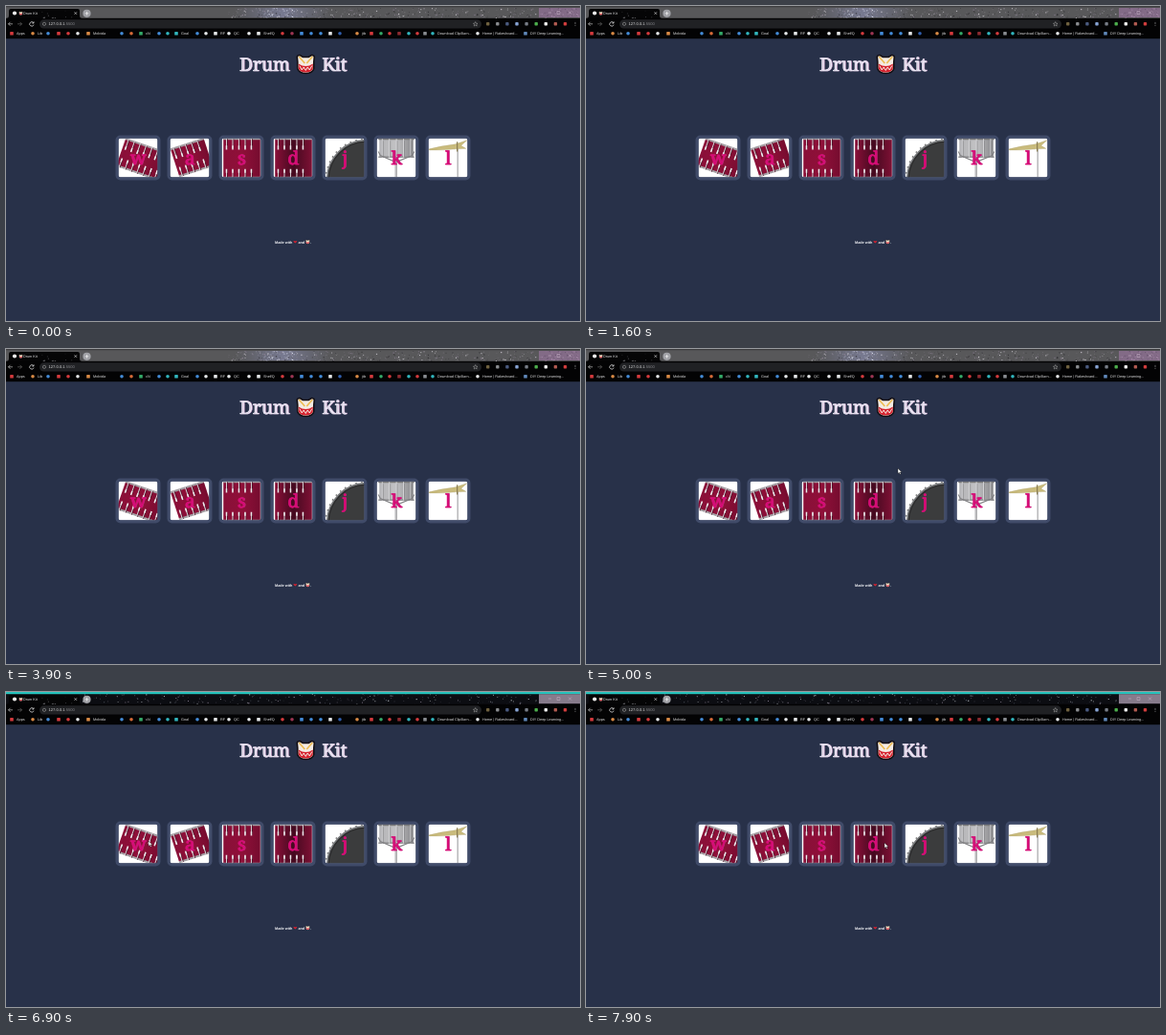
Recreate the animation shown at these times as an HTML page. Size 600 px wide and 330 px high, loop 8 s.

```html
<!DOCTYPE html>
<html lang="en">
<head>
<meta charset="utf-8">
<title>Drum Kit</title>
<style>
html, body { margin: 0; width: 100%; height: 100%; overflow: hidden; background: #283149; }
svg { display: block; }
#stage { width: 600px; height: 330px; }
text { font-family: "Liberation Sans", Arial, sans-serif; text-rendering: geometricPrecision; }
.ui { font-size: 3.8px; fill: #dededf; }
.note { font-size: 3.8px; font-weight: bold; fill: #f4f5f8; }
.title, .key { font-family: "Noto Serif", serif; font-size: 19px; }
.title { fill: #eef3fb; stroke: #eef3fb; stroke-width: .55; text-shadow: .7px 0 #d3a9cd; }
.key { fill: #dd0474; stroke: #dd0474; stroke-width: .5; text-anchor: middle; text-shadow: .7px 0 #c32b80; }
</style>
</head>
<body>
<svg id="stage" viewBox="0 0 600 330"></svg>
<script>
const stage = document.getElementById('stage');

let seed = 7;
const rnd = () => (seed = seed * 16807 % 2147483647) / 2147483647;
const many = (n, f) => Array.from({ length: n }, (_, i) => f(i)).join('');
const rect = (x, y, w, h, fill, more = '') =>
  `<rect x="${x}" y="${y}" width="${w}" height="${h}" fill="${fill}" ${more}/>`;
const disc = (x, y, r, fill, more = '') => `<circle cx="${x}" cy="${y}" r="${r}" fill="${fill}" ${more}/>`;
const path = (d, stroke, width, fill = 'none', more = '') =>
  `<path d="${d}" stroke="${stroke}" stroke-width="${width}" fill="${fill}" ${more}/>`;
const text = (x, y, s, cls = 'ui', more = '') => `<text x="${x}" y="${y}" class="${cls}" ${more}>${s}</text>`;

const stars = (n, x0, x1, colors) => many(n, i => {
  const s = .5 + rnd() * .7;
  return rect((x0 + rnd() * (x1 - x0)).toFixed(1), (2 + rnd() * 10).toFixed(1), s.toFixed(1), s.toFixed(1),
    colors[i % colors.length], `opacity="${(.3 + rnd() * .7).toFixed(2)}"`);
});

// Small drum symbol in a 20 x 20 box
const drumIcon = (x, y, scale) => `<g transform="translate(${x} ${y}) scale(${scale})">
  ${path('M1 3Q1 1 4 1L7 3H13L16 1Q19 1 19 3L18.5 8V15Q17 20 10 20Q3 20 1.5 15V8Z', '#151015', 1.6, '#f4ece4')}
  ${path('M2.5 10Q10 15 17.5 10V15Q16 19 10 19Q4 19 2.5 15Z', 'none', 0, '#d6232f')}
  ${path('M3 2.5L9 9.5M17 2.5L11 9.5', '#edbd55', 1.7)}
  ${path('M3.5 12L6 16.5L8 13.5L10 17L12 13.5L14 16.5L16.5 12', '#f7ece6', 1)}</g>`;

function chrome() {
  const idle = `<g id="idle">${rect(0, 0, 600, 13, '#58585a')}${rect(0, 0, 600, 1.3, '#3c3c3f')}
    ${rect(557, 2, 43, 10, '#836b87')}${rect(240, 2, 100, 10, 'url(#haze)')}
    ${stars(330, 232, 557, ['#e0dde4', '#29282c', '#97899e', '#77757a'])}
    ${stars(70, 265, 305, ['#d3d5e6', '#a1a3bb'])}${stars(60, 557, 600, ['#b393b5', '#614d69'])}</g>`;
  const active = `<g id="active">${rect(0, 0, 600, 13, '#0c0d12')}${rect(0, 0, 600, 2.2, '#25c2bb')}
    ${rect(557, 2.2, 43, 10, '#877b8b')}${stars(210, 80, 557, ['#d7dde3', '#59606c', '#8f8498'])}</g>`;
  const tab = path('M0 13Q3 13 3 10V5Q3 3 5 3H75Q77 3 77 5V10Q77 13 80 13Z', 'none', 0, '#050506')
    + `<svg x="4" width="72" height="13" viewBox="4 -2 72 13">${stars(16, 36, 74, ['#b5b5bd'])}</svg>`
    + disc(9, 7.5, 2.1, '#ededed') + drumIcon(13.5, 5.6, .2) + text(18, 9, 'Drum Kit')
    + path('M71.5 6.3L74 8.8M74 6.3L71.5 8.8', '#eee', .6)
    + disc(84.5, 7.8, 4.1, '#a2a3a8') + path('M82.7 7.8H86.3M84.5 6V9.6', '#fff', .6)
    + path('M567 7H570M576 5.5H579V8.5H576ZM588 5.5L591 8.5M591 5.5L588 8.5', '#c9b4c8', .5);
  const bar = rect(0, 12.8, 600, 21.4, '#030304')
    + rect(35, 14.3, 462, 9.2, '#202124', 'rx="4.6"')
    + path('M7 18.8H2.5M4.5 16.8L2.5 18.8L4.5 20.8', '#ddd', .6)
    + path('M12 18.8H16.5M14.5 16.8L16.5 18.8L14.5 20.8', '#777', .6)
    + path('M28.7 17.6A2.2 2.2 0 1 0 29 19.6M29 16.3V18H27.3', '#eee', .7)
    + disc(40, 18.8, 1.6, 'none', 'stroke="#bbb" stroke-width=".5"')
    + text(44.5, 20.3, '127.0.0.1<tspan fill="#85868a">:5500</tspan>', 'ui', 'style="font-size:4.1px"')
    + path('M490.7 16.5L491.4 18.2L493 18.3L491.8 19.4L492.2 21L490.7 20L489.2 21L489.6 19.4L488.4 18.3L490 18.2Z', '#ccc', .4);
  const extensions = ['#6f613f', '#8a8c90', '#4a5a80', '#86a2d2', '#777c86', '#4cad4c', '#eeeeee', '#b05a50', '#d03c3c']
    .map((c, i) => rect(502 + i * 10.1, 17, 3.4, 3.6, c, 'rx=".8"')).join('')
    + many(3, i => disc(595, 17.2 + i * 1.6, .45, '#ddd'));
  return idle + active + tab + bar + extensions;
}

function bookmarks() {
  const blue = '#438bd8', red = '#d43a3d', green = '#34a968', teal = '#31b5bd', gold = '#d98a45', pale = '#e4e6e8', grey = '#888b90';
  const items = [
    [6, red, 'Apps'], [28, gold, 'Lib'], [44, blue], [55, red], [65, red], [75, pale], [86, gold, 'Molvida'],
    [121, blue], [131, '#d66a37'], [141, green, 'cN'], [160, blue], [169, teal], [178, teal, 'Goal'], [200, blue],
    [209, pale], [219, pale, 'RF'], [233, pale, 'QC'], [254, pale], [264, pale, 'ShelfQ'], [289, red], [299, '#9c3552'],
    [309, blue], [319, blue], [329, blue], [339, pale], [349, '#315fae'], [367, gold, 'jtb'], [382, red],
    [392, green], [401, red], [411, '#8c2b31'], [421, teal], [430, red], [438, grey], [446, teal, 'Download ClipBarn...'],
    [493, pale, 'Home | Rakeshvard...'], [543, '#5f87b8', 'DIY Deep Learning...']
  ];
  return items.map(([x, color, label], i) =>
    (i % 3 ? disc(x, 28.7, 1.8, color) : rect(x - 1.8, 26.9, 3.6, 3.6, color, 'rx=".6"'))
    + (label ? text(x + 5, 30, label) : '')).join('');
}

// Shell with rims and tension rods, drawn from its top left corner
const shell = (w, h, fill) => rect(0, 1, w, h - 2, fill)
  + rect(0, 0, w, 2, '#a39ea2') + rect(0, h - 2, w, 2, '#a39ea2')
  + many(Math.floor(w / 6.4), i => {
    const x = 3.2 + i * 6.4;
    return path(`M${x + .8} 1V11M${x + .8} ${h - 9}V${h}`, '#4a1428', 1)
      + path(`M${x} 0V11M${x} ${h - 9}V${h}`, '#d6cfd4', 1)
      + path(`M${x} 8V12M${x} ${h - 10}V${h - 6}`, '#eee7eb', 1.5);
  });
const place = (transform, body) => `<g transform="${transform}">${body}</g>`;

const pads = {
  w: place('translate(8 0) rotate(19)', shell(46, 31, 'url(#wine)')),
  a: place('translate(.5 11) rotate(-18)', shell(36, 31, 'url(#wine)')),
  s: place('translate(2 0)', shell(38, 42, 'url(#wine)')),
  d: place('translate(2 0)', shell(38, 42, 'url(#dark)')),
  j: disc(43, 43, 42, 'none', 'stroke="#777" stroke-width="1.4" stroke-dasharray="1.5 4.5"')
    + disc(43, 43, 40.6, '#3b3c3d', 'stroke="#77797b" stroke-width="1.6"')
    + disc(43, 43, 39, 'none', 'stroke="#29292a" stroke-width="1"'),
  k: rect(3, 1, 35, 19, 'url(#steel)') + rect(2, 0, 37, 2, '#777') + rect(2, 19, 37, 1.4, '#8b8b8d')
    + many(5, i => path(`M${6 + i * 7.3} 1V20`, '#d8d8da', .9) + path(`M${7 + i * 7.3} 3V19`, '#77777a', .5))
    + path('M2 14L4 18L20 25L37 18L39 14', '#808083', 1.1) + path('M20.2 20V41', '#8d8d90', 2) + path('M20 21V41', '#cfcfd2', .7),
  l: path('M30.5 9V41', '#a0a0a2', 1.1)
    + path('M1 11.5Q15 8 28 6.5L40 2.5L34 8L39 11L29 11.5Q14 13 1 12.5Z', '#a2955f', .3, '#c9bb7c')
    + path('M30 4V14', '#8a7d52', 1.2)
};

const tile = (key, i) => {
  const x = 138 + 54 * i;
  return `<svg x="${x - 20.8}" y="138.2" width="41.6" height="41.6" viewBox="0 0 41 41">${rect(0, 0, 41, 41, '#fff')}${pads[key]}</svg>`
    + rect(x - 21.9, 137.1, 43.8, 43.8, 'none', 'rx="3.4" stroke="#404b69" stroke-width="3.2"')
    + text(x, 165.5, key, 'key');
};

const gradient = (id, ...colors) => `<linearGradient id="${id}">${colors.map((c, i) =>
  `<stop offset="${i / (colors.length - 1)}" stop-color="${c}"/>`).join('')}</linearGradient>`;

stage.innerHTML = `<defs>${gradient('wine', '#8a0f38', '#8f1039', '#760c2f')}
  ${gradient('dark', '#8a0f38', '#450a20', '#7d1034')}${gradient('steel', '#b4b4b7', '#c2c2c4', '#88888b')}
  ${gradient('haze', '#77799000', '#777990', '#77799000')}</defs>`
  + rect(0, 0, 600, 330, '#283149') + chrome() + bookmarks()
  + text(244, 68.3, 'Drum', 'title') + drumIcon(303.3, 50.5, 1) + text(330.2, 68.3, 'Kit', 'title')
  + Object.keys(pads).map(tile).join('')
  + text(281, 248.6, 'Made with', 'note')
  + path('M302.3 248.6L300.4 246.7Q300.8 245.6 302.3 246.6Q303.8 245.6 304.2 246.7Z', 'none', 0, '#d9222f')
  + text(305.4, 248.6, 'and', 'note') + drumIcon(313.2, 244.8, .22) + text(317.8, 248.6, '.', 'note')
  + path('M0 0V5.4L1.3 4.3L2.2 6.3L3.2 5.8L2.3 3.9H4Z', '#111', .4, '#fff', 'id="cursor"');

const [idle, active, cursor] = ['idle', 'active', 'cursor'].map(id => document.getElementById(id));

// Pointer stops: time, x, y
const stops = [[4300, 606, 90], [4700, 326, 126], [5000, 326, 125], [5700, 326, 125], [5900, 326, 124],
  [6300, 326, 124], [6800, 149, 156], [7400, 149, 156], [7900, 312, 158], [8000, 312, 158]];

function pointer(t) {
  const i = Math.max(1, stops.findIndex(s => s[0] >= t));
  const [t0, x0, y0] = stops[i - 1], [t1, x1, y1] = stops[i];
  const p = Math.max(0, (t - t0) / (t1 - t0)), e = p * p * (3 - 2 * p);
  return [x0 + (x1 - x0) * e, y0 + (y1 - y0) * e];
}

const start = performance.now();
function draw() {
  const t = Math.floor((performance.now() - start) % 8000 / 100) * 100;
  const focused = t >= 6800;
  idle.style.display = focused ? 'none' : '';
  active.style.display = focused ? '' : 'none';
  cursor.style.display = t >= 4400 ? '' : 'none';
  cursor.setAttribute('transform', `translate(${pointer(t)})`);
  requestAnimationFrame(draw);
}
draw();
</script>
</body>
</html>
```
